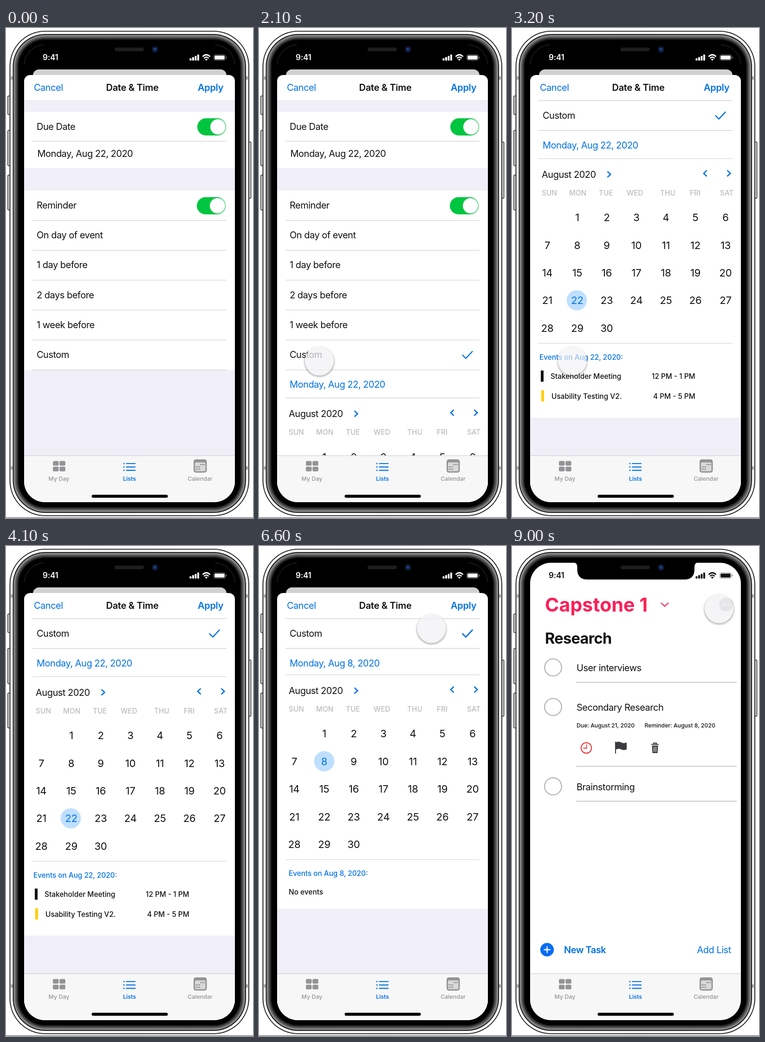
These frames come from a looping animation (532x1053 px, 9100 ms). An HTML page:

```html
<!DOCTYPE html>
<html lang="en">
<head>
<meta charset="utf-8">
<title>Reminder date picker</title>
<style>
html, body { margin: 0; width: 100%; height: 100%; overflow: hidden; background: #fff; }
svg { display: block; width: 532px; height: 1053px; }
text { font-family: Inter, "Liberation Sans", sans-serif; white-space: pre; }
</style>
</head>
<body>
<svg id="stage" viewBox="0 0 532 1053" xmlns="http://www.w3.org/2000/svg"></svg>
<script>
const LOOP = 9100, BLUE = '#0071e3', INK = '#111', PALE = '#f0eff8', RULE = '#d6d6da';
const SCROLL_END = 514.4;

// Shape helpers
const rect = (x, y, w, h, fill, r = 0, more = '') =>
  `<rect x="${x}" y="${y}" width="${w}" height="${h}" rx="${r}" fill="${fill}" ${more}/>`;
const disc = (x, y, r, fill, more = '') =>
  `<circle cx="${x}" cy="${y}" r="${r}" fill="${fill}" ${more}/>`;
const line = (d, color, w, more = '') =>
  `<path d="${d}" fill="none" stroke="${color}" stroke-width="${w}" ${more}/>`;
const rule = (y, x1 = 57, x2 = 475, color = RULE) => line(`M${x1} ${y}H${x2}`, color, 1.3);
const group = (id, body) => `<g id="${id}">${body}</g>`;
const text = (str, x, y, o = {}) => {
  const { size = 20, weight = 400, fill = INK, track = -.025, anchor = 'start', more = '' } = o;
  return `<text x="${x}" y="${y}" font-size="${size}" font-weight="${weight}" fill="${fill}"
    letter-spacing="${track * size}" text-anchor="${anchor}" ${more}>${str}</text>`;
};
const round = 'stroke-linecap="round" stroke-linejoin="round"';

function status(color) {
  const bars = [5, 7.5, 10, 13].map((h, i) => rect(395.5 + i * 5.5, 70 - h, 4, h, color, 1)).join('');
  const wifi = line('M423.5 61.5Q431.5 53.5 439.5 61.5', color, 2.6)
    + line('M426.5 65Q431.5 60 436.5 65', color, 2.5)
    + `<path d="M428.6 67.2Q431.5 64.6 434.4 67.2L431.5 70.4Z" fill="${color}"/>`;
  const battery = rect(447.5, 57.5, 25, 12, 'none', 3.5, `stroke="${color}" stroke-opacity=".5"`)
    + rect(449.2, 59.2, 21.6, 8.6, color, 2)
    + rect(474, 61.5, 1.5, 4, color, .8, 'opacity=".5"');
  return text('9:41', 79, 69, { size: 17, weight: 600, fill: color, track: -.01 }) + bars + wifi + battery;
}

const toggle = (x, y) => rect(x, y, 62, 37, '#00c540', 18.5) + disc(x + 44.5, y + 18.5, 16.5, '#fff');

// Calendar part of the form for one selected day
function calendar(sel, dy, eventsX, events, bottom) {
  const y = v => v + dy;
  const cols = [76, 140.5, 204, 268, 331.5, 395, 460];
  const heads = { SUN: 64, MON: 123, TUE: 187, WED: 247, THU: 319, FRI: 383, SAT: 448 };
  let s = rect(39, 735, 454, 900, PALE) + rect(39, 735, 454, bottom - 735, '#fff') + rule(734.7)
    + line('M438.5 703l7 7 14-15', BLUE, 2.4, round)
    + text(`Monday, Aug ${sel}, 2020`, 66, 773, { fill: BLUE })
    + rule(y(795))
    + text('August 2020', 64, y(836))
    + line(`M205.5 ${y(822.8)}l6.8 6.2-6.8 6.2M419.5 ${y(820.5)}l-6.5 6.3 6.5 6.3M463.5 ${y(820.5)}l6.8 6.3-6.8 6.3`, BLUE, 2.6);
  for (const d in heads)
    s += text(d, heads[d], y(874), { size: 15.3, weight: 500, fill: '#bcbcc1', track: 0 });
  for (let d = 1; d <= 30; d++) {
    const x = cols[d % 7], my = y(921.7 + Math.floor(d / 7) * 59.4), on = d === sel;
    if (on) s += disc(x - (d > 9 ? 1 : 0), my - .3, 21.8, '#bfdffe');
    s += text(d, x, my + 8, { size: 22, anchor: 'middle', track: -.01,
      fill: on ? BLUE : INK, more: d === 8 && !on ? 'id="eight"' : '' });
  }
  return s + rule(y(1192))
    + text(`Events on Aug ${sel}, 2020:`, eventsX, y(1227.5), { size: 15.3, weight: 500, fill: BLUE, track: 0 })
    + events;
}

const small = { size: 15.4, weight: 500, track: 0 };
const busy = rect(62, 1250.5, 6, 24, INK) + text('Stakeholder Meeting', 83, 1268.5, small)
  + text('12 PM - 1 PM', 301, 1268.5, small)
  + rect(63, 1293, 6, 24, '#ffce00') + text('Usability Testing V2.', 85, 1311, small)
  + text('4 PM - 5 PM', 304, 1311, small);
const free = text('No events', 64, 1263.5, small);

function sheet() {
  const rows = ['Reminder', 'On day of event', '1 day before', '2 days before', '1 week before', 'Custom'];
  const form = rect(39, 150, 454, 1500, PALE)
    + rect(39, 180, 454, 121, '#fff') + rect(39, 349, 454, 386, '#fff')
    + text('Due Date', 66, 218.5) + rule(243.5) + text('Monday, Aug 22, 2020', 67.5, 276.5)
    + toggle(412, 194) + toggle(411, 363.5)
    + rows.map((r, i) => text(r, 66, 388 + i * 64.2) + rule(413.5 + i * 64.23)).join('')
    + group('calA', calendar(22, 0, 59, busy, 1351.8))
    + group('calB', calendar(8, -3.8, 64, free, 1294));
  return rect(39, 30, 454, 150, '#000') + status('#fff')
    + rect(58, 89, 417, 40, '#d1d1d1', 13)
    + rect(39, 101, 454, 80, '#fff', 13)
    + `<g clip-path="url(#body)">${group('form', form)}</g>`
    + text('Cancel', 60, 135, { fill: BLUE })
    + text('Date &amp; Time', 272, 135, { weight: 600, anchor: 'middle', track: -.015 })
    + text('Apply', 413, 135, { weight: 600, fill: BLUE, track: -.015 });
}

function tasks() {
  const ring = y => disc(88.5, y, 18.3, '#fff', 'stroke="#b6b6ba" stroke-width="2.3"');
  const note = { size: 12.2, weight: 500, track: 0 }, dark = '#3c3c40';
  const under = y => rule(y, 138.5, 484, '#b9b9be');
  return rect(39, 30, 454, 1000, '#fff') + status('#111')
    + text('Capstone 1', 71, 141, { size: 41, weight: 700, fill: '#fb2058', track: .003 })
    + line('M321 122l8 7.5 8-7.5', '#fb2058', 2.2)
    + disc(461, 126, 15, '#c6c6c9') + [455, 461, 467].map(x => disc(x, 126, 2, '#fff')).join('')
    + text('Research', 71, 210, { size: 32.5, weight: 700, track: -.02 })
    + ring(261) + text('User interviews', 139, 269) + under(293)
    + ring(346) + text('Secondary Research', 139, 354)
    + text('Due: August 21, 2020', 139, 390, note)
    + text('Reminder: August 8, 2020', 285.5, 390, note)
    + disc(160, 434, 11.2, 'none', 'stroke="#ee3131" stroke-width="2"')
    + line('M160.5 426.5v8h-7', '#ee3131', 1.8)
    + line('M223 420.5V446', dark, 2)
    + `<path d="M223 422q6-3 12 0t12 0v15q-6 3-12 0t-12 1z" fill="${dark}"/>`
    + line('M300 426.5H316M305 426V423.5H311V426', dark, 2)
    + `<path d="M301.5 429H314.5L313.5 445H302.5Z" fill="${dark}"/>`
    + line('M305.3 431.5v11M308 431.5v11M310.7 431.5v11', '#fff', 1)
    + under(473.5)
    + ring(516.5) + text('Brainstorming', 139, 525) + under(548.5)
    + disc(75.5, 867.5, 14.6, '#066cf5') + line('M68.5 867.5h14M75.5 860.5v14', '#fff', 2.3)
    + text('New Task', 112, 874.5, { weight: 600, fill: BLUE })
    + text('Add List', 398.5, 874.5, { fill: BLUE });
}

function tabs() {
  const grey = '#949496';
  const label = (s, x, fill, weight) =>
    text(s, x, 973, { size: 12.3, weight, fill, track: .005, anchor: 'middle' });
  let s = rect(39, 919, 454, 101, '#f7f7f8', 0, 'opacity=".992"') + line('M39 919H493', '#c8c8cb', 1.2);
  for (const x of [101, 115.3]) for (const y of [930.5, 942.8]) s += rect(x, y, 12.5, 10, grey, 2.5);
  for (const y of [936, 943.3, 950.6])
    s += disc(254, y, 1.5, BLUE) + line(`M258.5 ${y}H279`, BLUE, 2.2);
  s += rect(404, 927, 28.5, 28.5, grey, 5) + rect(407, 933.5, 22.5, 19, '#d9d9da', 2);
  for (const [n, x, y] of [[3, 418.5, 938], [3, 408.5, 943], [3, 408.5, 948]])
    for (let i = 0; i < n; i++) s += rect(x + i * 3.6, y - 1, 2.3, 2.3, '#858587');
  return s + label('My Day', 114, grey, 500) + label('Lists', 266, BLUE, 600) + label('Calendar', 418, grey, 500)
    + rect(184.5, 1003, 164, 6.5, '#000', 3.2);
}

function shell() {
  const layer = (i, fill) => rect(7.5 + i, 6 + i, 516.5 - 2 * i, 1043 - 2 * i, fill, 77 - i);
  const key = (x, y, h) => rect(x, y, 8, h, '#e4e4e6', 2, 'stroke="#2a2a2a" stroke-width="1.6"');
  let s = rect(0, 1051.6, 532, 1.4, '#7d7d80')
    + key(4, 146, 40) + key(4, 220, 76) + key(4, 316, 75) + key(519.5, 245, 121)
    + layer(0, '#1c1c1d') + layer(1.8, 'url(#steel)');
  for (const x of [9, 516]) for (const y of [104, 942]) s += rect(x, y, 6.5, 7, '#a9a9ab');
  s += layer(7, '#161616');
  // Rim darkens inwards
  for (let i = 0; i <= 10; i++) {
    const v = Math.round(150 * (1 - i / 10));
    s += layer(9 + i * 1.1, `rgb(${v},${v},${v})`);
  }
  return s;
}

const notch = `<path d="M132 35Q140.5 36 140.5 45V50Q140.5 72 163 72H371Q393 72 393 50V45Q393 36 401.5 35Z" fill="#000"/>`
  + rect(234, 42, 63, 8, '#1d1d1f', 4) + disc(321, 46, 7.5, '#0c1226')
  + disc(321, 46, 4, '#14306a') + disc(320, 45, 1.2, '#2f5fa8');

const stop = (at, color, a = 1) => `<stop offset="${at}" stop-color="${color}" stop-opacity="${a}"/>`;

document.getElementById('stage').innerHTML = `<defs>
  <linearGradient id="steel">${stop(0, '#d8d8da') + stop(.008, '#fff') + stop(.5, '#f1f1f2')
    + stop(.992, '#fff') + stop(1, '#d8d8da')}</linearGradient>
  <radialGradient id="shade">${stop(.8, '#000', 0) + stop(.86, '#000', .24) + stop(1, '#000', 0)}</radialGradient>
  <mask id="outside">${rect(-50, -50, 100, 100, '#fff') + disc(0, 0, 31, '#000')}</mask>
  <clipPath id="screen">${rect(39, 36, 454, 983, '#000', 45)}</clipPath>
  <clipPath id="body">${rect(39, 155, 454, 870, '#000')}</clipPath></defs>`
  + shell()
  + `<g clip-path="url(#screen)">${group('tasks', tasks())}${group('sheet', sheet())}${tabs()}`
  + group('cursor', `<g mask="url(#outside)">${disc(0, 2.5, 35, 'url(#shade)')}</g>`
    + disc(0, 0, 31, '#f2f2f4', 'fill-opacity=".74"')) + '</g>'
  + notch;

// Motion: rows of [time, value, ...], straight between rows
function along(t, keys) {
  let i = 1;
  while (i < keys.length - 1 && t > keys[i][0]) i++;
  const a = keys[i - 1], b = keys[i];
  const u = Math.min(1, Math.max(0, (t - a[0]) / (b[0] - a[0])));
  return a.slice(1).map((v, k) => v + (b[k + 1] - v) * u);
}
const ramp = (t, from, to) => Math.min(1, Math.max(0, (t - from) / (to - from)));

// Same curve as CSS ease-out
const easeOut = u => {
  let lo = 0, hi = 1;
  for (let i = 0; i < 20; i++) {
    const s = (lo + hi) / 2;
    if (1.74 * s * s * (1 - s) + s ** 3 < u) lo = s; else hi = s;
  }
  return 3 * lo * lo * (1 - lo) + lo ** 3;
};

const cursorPath = [ // time, x, y, opacity
  [100, 444, 1090, 1], [600, 435, 960, 1], [1000, 411, 806, 1], [1300, 235, 738, 1],
  [1500, 138, 718, 1], [1700, 130, 715, 1], [3150, 130, 715, 1], [3500, 130, 715, 0],
  [5600, 141, 463, 0], [5800, 141, 463, 1], [6150, 141, 463, 1], [6350, 200, 400, 1],
  [6500, 300, 262, 1], [6600, 371, 177, 1], [6700, 420, 146, 1], [6800, 446, 134, 1], [9100, 446, 134, 1]
];

const el = id => document.getElementById(id);
const [form, calA, calB, eight, sheetEl, cursor] = ['form', 'calA', 'calB', 'eight', 'sheet', 'cursor'].map(el);
const fade = (node, v) => node.setAttribute('opacity', v.toFixed(3));
const move = (node, x, y) => node.setAttribute('transform', `translate(${x.toFixed(2)} ${y.toFixed(2)})`);

function draw(t) {
  move(form, 0, -SCROLL_END * easeOut(ramp(t, 2500, 3172)));
  fade(calA, ramp(t, 1800, 2100));
  fade(eight, 1 - .4 * ramp(t, 5100, 5200));
  fade(calB, ramp(t, 5200, 5500));
  fade(sheetEl, 1 - ramp(t, 7500, 7800));
  const [x, y, a] = along(t, cursorPath);
  move(cursor, x, y);
  fade(cursor, a);
}

const start = performance.now();
function tick() {
  draw((performance.now() - start) % LOOP);
  requestAnimationFrame(tick);
}
draw(0);
requestAnimationFrame(tick);
</script>
</body>
</html>
```
